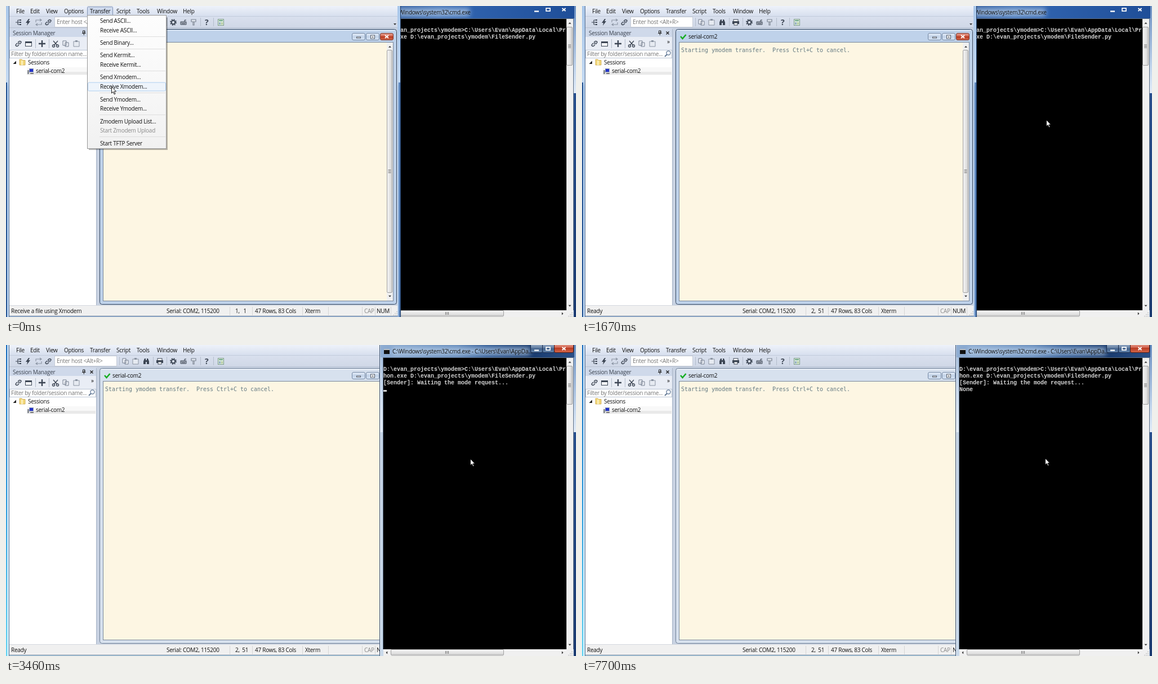
These frames come from a looping animation (1012 px wide and 553 px high, 8 s). An HTML page:

```html
<!DOCTYPE html>
<html lang="en">
<head>
<meta charset="utf-8">
<title>Ymodem transfer</title>
<style>
html, body { margin: 0; width: 100%; height: 100%; overflow: hidden; background: #1b3c74; }
svg { display: block; width: 100vw; height: 100vh; }
text { white-space: pre; font: 10px "Open Sans", "Noto Sans", sans-serif; letter-spacing: -.27px; fill: #111; }
.term { font: 10px "DejaVu Sans Mono", "Noto Sans Mono", monospace; letter-spacing: -.02px; fill: #657b83; }
.con { font: bold 10px "Liberation Mono", "Noto Sans Mono", monospace; letter-spacing: 0; fill: #d4d4d4; }
.head { fill: #3c4450; }
.soft { fill: #777; }
.dim { fill: #8a8a8a; }
</style>
</head>
<body>
<svg id="stage" viewBox="0 0 1012 553" preserveAspectRatio="none"></svg>
<script>
const LOOP = 8000;
const stage = document.getElementById('stage');
const esc = s => s.replace(/&/g, '&amp;').replace(/</g, '&lt;').replace(/>/g, '&gt;');

// Text is placed by its left edge and the middle of its capitals.
const text = (x, mid, s, cls = '', id = '') =>
  `<text x="${x}" y="${mid + 3.6}" class="${cls}" id="${id}">${esc(s)}</text>`;
const rect = (x, y, w, h, fill, more = '') =>
  `<rect x="${x}" y="${y}" width="${w}" height="${h}" fill="${fill}" ${more}/>`;
const box = (x, y, w, h, fill, line, r = 0) =>
  rect(x + .5, y + .5, w - 1, h - 1, fill, `stroke="${line}" rx="${r}"`);
const path = (d, fill, line = 'none', w = 1) =>
  `<path d="${d}" fill="${fill}" stroke="${line}" stroke-width="${w}"/>`;
const icon = (x, y, body) => `<g transform="translate(${x} ${y})">${body}</g>`;
const group = (id, body) => `<g id="${id}">${body}</g>`;
const vline = (x, y, h, c = '#b3bccb') => rect(x, y, 1, h, c);
const grad = (id, stops, across) =>
  `<linearGradient id="${id}" x2="${across ? 1 : 0}" y2="${across ? 0 : 1}">` +
  stops.map(([o, c]) => `<stop offset="${o}" stop-color="${c}"/>`).join('') + '</linearGradient>';

const INK = '#3d4654';
const shape = {
  link: path('M-1 1L2-2M-2-1l-2 2q-2 2 0 3t3 0l2-2M2 1l2-2q2-2 0-3t-3 0l-2 2', 'none', INK, 1.4),
  tree: path('M-5 0H-1M-1-4V4M-1-4H4M-1 0H4M-1 4H4', 'none', INK, 1.2) +
    rect(2, -5, 3, 2, INK) + rect(2, -1, 3, 2, INK) + rect(2, 3, 3, 2, INK),
  bolt: path('M1-6L-4 1H-1L-2 6 4-2H1L3-6Z', INK),
  loop: path('M-5 0V-4H4M2-6l3 2-3 2M5 0V4H-4M-2 2l-3 2 3 2', 'none', '#8a93a2', 1.1),
  copy: path('M-5-5H1V3H-5ZM-1-2H5V5H-1Z', '#edf0f6', '#737d8d'),
  paste: path('M-5-4H5V5H-5Z', '#e6eaf1', '#8b94a2') + rect(-2, -6, 4, 3, '#8b94a2'),
  find: path('M-5 5V0L-3-5H-1V-2H1V-5H3L5 0V5H1V1H-1V5Z', INK),
  print: rect(-4, -5, 8, 4, '#fff', `stroke="${INK}"`) + rect(-6, -2, 12, 5, INK) + rect(-3, 1, 6, 4, '#fff', `stroke="${INK}"`),
  gear: `<circle r="3.3" fill="none" stroke="${INK}" stroke-width="2"/>` +
    `<circle r="5" fill="none" stroke="${INK}" stroke-width="1.8" stroke-dasharray="2 1.93"/>`,
  keys: path('M-5-1H5V4H-5ZM2-1V-4H5', '#b9c0cc', INK) + path('M-4 1H4M-3 2.7H3', 'none', INK, .8),
  key: path('M-4-5H4V-1H-4ZM-1-1V5H1V-1', '#dfe4ec', '#7b8492', 1.2),
  pane: box(-6, -4, 12, 9, '#f4f6fa', INK) + rect(-6, -4, 12, 3, INK),
  plus: path('M-6 0H6M0-6V6', 'none', INK, 2.4),
  cut: path('M-4-5L3 3M4-5L-3 3', 'none', INK, 1.4) +
    `<circle cx="-3.5" cy="4" r="2" fill="none" stroke="${INK}" stroke-width="1.4"/><circle cx="3.5" cy="4" r="2" fill="none" stroke="${INK}" stroke-width="1.4"/>`,
  sheet: box(-5, -6, 11, 12, '#dcebdd', '#7f9d8a') + rect(-3, -4, 7, 2, '#6fa888') + rect(-3, 0, 3, 4, '#93aec2') + rect(1, 0, 3, 4, '#b7cda4'),
  cross: path('M-2.5-2.5L2.5 2.5M2.5-2.5L-2.5 2.5', 'none', '#222', 1.4),
  pin: path('M-1.5-4H2V0H-1.5ZM-3 .5H3.5M.3 .5V4M1.4-4V0', 'none', '#222'),
};
const put = list => list.map(([name, x, y]) => icon(x, y, shape[name])).join('');

const arrow = (x, y, dir) => icon(x, y,
  path({ up: 'M-2.5 1.2L0-1.5 2.5 1.2Z', down: 'M-2.5-1.2L0 1.5 2.5-1.2Z',
         left: 'M1.2-2.5L-1.5 0 1.2 2.5Z', right: 'M-1.2-2.5L1.5 0-1.2 2.5Z' }[dir], '#333'));
const grip = (x, y, tall) => path(tall ? `M${x - 2.5} ${y - 2.5}h5m-5 2.5h5m-5 2.5h5`
  : `M${x - 2.5} ${y - 2.5}v5m2.5-5v5m2.5-5v5`, 'none', '#666', .9);
const scroller = (x, y, w, h, from, to) =>
  rect(x, y, w, h, '#f0f0f0') + arrow(x + w / 2, y + 7.5, 'up') + arrow(x + w / 2, y + h - 8, 'down') +
  box(x, from, w - 1, to - from, 'url(#thumb)', '#a0a0a0', 1.5) + grip(x + w / 2 - .5, (from + to) / 2, true);

const defs = '<defs>' +
  grad('menubar', [[0, '#eef2fa'], [1, '#d7dfee']]) +
  grad('tools', [[0, '#d9e0ee'], [1, '#cfd7e6']]) +
  grad('thumb', [[0, '#f5f5f5'], [.5, '#e6e6e6'], [1, '#cfcfcf']], true) +
  grad('thumbH', [[0, '#f5f5f5'], [.5, '#e6e6e6'], [1, '#cfcfcf']]) +
  grad('button', [[0, '#e6eef9'], [.5, '#c3d3e8'], [1, '#d8e5f5']]) +
  grad('red', [[0, '#e8a597'], [.48, '#cf5e48'], [.5, '#b93a21'], [1, '#d2694d']]) +
  grad('navy', [[0, '#a3b6cf'], [.5, '#5f7b9f'], [.52, '#3f5f89'], [1, '#6686ad']]) +
  grad('popup', [[0, '#fdfdfd'], [.5, '#f8f8f8'], [1, '#f1f1f1']]) +
  grad('leftOn', [[0, '#a9c7ea'], [.24, '#c3d9f2'], [.26, '#a9c8ec'], [1, '#bad3f0']]) +
  grad('leftOff', [[0, '#c3dbf3'], [.5, '#cfe6f8'], [1, '#cdf0fb']]) +
  grad('desk', [[0, '#1f6fbd'], [.5, '#2f9bdc'], [1, '#63d3f2']]) +
  grad('titleOff', [[0, '#244f92'], [.3, '#4070b4'], [.45, '#2f62ad'], [1, '#1f4e98']], true) +
  grad('titleOn', [[0, '#8fadd2'], [.4, '#5f86b8'], [.55, '#2a5590'], [.75, '#16386b'], [1, '#2a4f86']], true) +
  grad('edge', [[0, '#6f93c3'], [.2, '#c3d6ed'], [.28, '#e2ecf8'], [.281, '#28508e'], [1, '#1a3a70']]) +
  grad('glass', [[0, '#9db8d8'], [.15, '#cbdbee'], [.28, '#e2ebf6'], [.281, '#c3d2e4'], [1, '#c9d9ea']]) +
  '<filter id="blur" x="-20%" y="-80%" width="140%" height="260%"><feGaussianBlur stdDeviation="4"/></filter></defs>';

const menus = [['File', 18], ['Edit', 43], ['View', 71], ['Options', 103], ['Transfer', 149],
  ['Script', 196], ['Tools', 232], ['Window', 268], ['Help', 314]];
const entries = [['Send ASCII...', 26], ['Receive ASCII...', 43], ['Send Binary...', 65], ['Send Kermit...', 87.5],
  ['Receive Kermit...', 104], ['Send Xmodem...', 126.5], ['Receive Xmodem...', 143.5], ['Send Ymodem...', 166],
  ['Receive Ymodem...', 182.5], ['Zmodem Upload List...', 205], ['Start Zmodem Upload', 221.5], ['Start TFTP Server', 244]];

const menuHead = box(144, 1, 46, 16, '#cfdaed', '#8193b3', 1);
const popup = group('popup',
  rect(147, 20, 140, 236, '#000', 'opacity=".28"') +
  box(144, 16, 141, 238, 'url(#popup)', '#979797') +
  [54, 76, 115, 154, 193, 232].map(y => rect(166, y, 117, 1, '#dedede')).join('') +
  '<rect id="hot" x="145.5" width="138" height="15" rx="2" fill="#eef4fb" stroke="#aecff0"/>' +
  entries.map(([s, y]) => text(167, y, s, s === 'Start Zmodem Upload' ? 'dim' : '')).join(''));

const toolbar =
  rect(6, 18, 689, 23, 'url(#tools)') + rect(6, 18, 689, 1, '#c3ccdc') + rect(6, 38, 689, 1, '#bac4d5') +
  box(86, 19, 111, 19, '#fff', '#c5cbd6') + text(90, 28.5, 'Enter host <Alt+R>', 'soft') +
  put([['tree', 22, 29], ['bolt', 39, 29], ['loop', 58, 29], ['link', 75, 29], ['copy', 212, 29], ['paste', 230, 29],
    ['find', 249, 29], ['print', 273, 29], ['gear', 297, 29], ['keys', 315, 29], ['key', 333, 29], ['sheet', 381, 29]]) +
  [201, 261, 285, 345, 368].map(x => vline(x, 21, 15)).join('') +
  '<text x="353" y="34" style="font-size:14px;font-weight:700;fill:#3d4654">?</text>' +
  path('M688 31h5l-2.5 3Z', '#333');

const sessions =
  rect(6, 41, 154, 491, '#fff') + rect(6, 41, 154, 14, '#cfd9ea') + text(12, 48, 'Session Manager', 'head') +
  put([['pin', 138, 48], ['cross', 152, 48]]) +
  rect(6, 55, 154, 23, '#e9edf5') + text(151, 63, '»') +
  put([['link', 22, 67], ['pane', 40, 67], ['plus', 64, 67], ['cut', 88, 67], ['copy', 106, 67], ['paste', 125, 67]]) +
  vline(52, 59, 16) + vline(76, 59, 16) +
  box(6, 78, 154, 15, '#fff', '#bcc6d5') + text(9, 85.5, 'Filter by folder/session name...', 'soft') +
  '<circle cx="153.5" cy="83.5" r="3.6" fill="#f5f9ff" stroke="#5c7390" stroke-width="1.2"/>' +
  path('M151 86l-4 4', 'none', '#5c7390', 1.8) +
  path('M18 97.5V103h-5.5Z', '#222') +
  path('M24 95h4l1 1.5h5V105H24Z', '#f3d87a', '#c9a44a', .8) + rect(27, 97, 3, 8, '#fbeeb5') +
  text(39, 100.5, 'Sessions') +
  rect(37, 109, 122, 14, '#f8f8f8') + rect(37, 117, 122, 5, '#e9e9e9') +
  rect(38, 114, 3, 7, '#8a8f96') + box(41, 111, 8, 7, '#2333c8', '#9ba5bd') + rect(43, 119, 6, 2, '#777') +
  text(53, 115.5, 'serial-com2') + vline(160, 41, 491, '#a9b5c7');

const button = (x, y, w, h, glyph, fill = 'url(#button)', line = '#7387a3') =>
  box(x, y, w, h, fill, line, 2.5) + icon(x + w / 2, y + h / 2, glyph);
const min = box(-4, 0, 8, 3, '#fff', '#4c5563');
const max = box(-4, -3, 8, 7, '#fff', '#4c5563') + rect(-1.5, 0, 3, 1.5, '#4c5563');
const close = path('M-3-2.5L3 2.5M3-2.5L-3 2.5', 'none', '#fff', 2);

const child =
  rect(161, 39, 534, 493, '#c8d2e2') +
  '<rect id="frame" x="166.5" y="41.5" width="527" height="489" rx="4"/>' +
  rect(168, 43, 524, 1, '#fff', 'opacity=".6"') +
  path('M175 54l3.5 4 6-7', 'none', '#17ae22', 2.6) + text(189, 54.5, 'serial-com2') +
  button(614, 48, 24, 13, min) + button(639, 48, 24, 13, max) +
  button(664, 48, 24, 13, close, 'url(#red)', '#7c352b') +
  box(172, 64, 516, 461, '#fdf6e3', '#77869a') +
  scroller(676, 65, 11, 459, 78, 510) +
  text(176, 78.5, 'Starting ymodem transfer.  Press Ctrl+C to cancel.', 'term', 'note');

const status =
  rect(6, 532, 689, 19, '#f0f0f0') + rect(6, 532, 689, 1, '#d4d8df') + rect(5, 551, 691, 1, '#536b8c') +
  text(9, 542.5, '', '', 'hint') + text(285, 542.5, 'Serial: COM2, 115200') + text(407, 542.5, '', '', 'place') +
  text(442, 542.5, '47 Rows, 83 Cols') + text(531, 542.5, 'Xterm') + text(636, 542.5, 'CAP', 'dim') + text(658, 542.5, 'NUM') +
  [397, 437, 526, 572, 632, 655, 683].map(x => vline(x, 535, 15, '#d5d5d5')).join('') +
  path('M694 543v1M691 546v1M694 546v1M688 549v1M691 549v1M694 549v1', 'none', '#aaa', 1.5);

const main = group('main',
  rect(0, 0, 701, 553, 'url(#leftOn)', 'id="rim"') + group('rimOn',
    rect(0, 136, 2, 417, '#285694') + rect(697, 136, 3, 417, '#5d85ba') + rect(700, 0, 1, 553, '#17345f')) +
  group('rimOff', rect(0, 0, 2, 553, 'url(#desk)')) +
  rect(5, 0, 1, 553, '#536b8c') + rect(6, 0, 689, 18, 'url(#menubar)') +
  group('menuHead', menuHead) + menus.map(([s, x]) => text(x, 9, s)).join('') +
  toolbar + sessions + child + status + popup);

const white = { min: path('M-4 1.5H4', 'none', '#fff', 2.4), max: rect(-3.5, -2.5, 7, 5, 'none', 'stroke="#fff" stroke-width="1.7"') };
const cmd = group('cmd',
  rect(1007, 0, 5, 553, 'url(#edge)') + rect(663, 0, 345, 553, 'url(#glass)') +
  rect(663, 0, 346, 22, 'url(#titleOff)', 'id="bar"') +
  '<rect id="glow" x="686" y="4" height="14" fill="#c0d5ed" opacity=".7" filter="url(#blur)"/>' +
  group('keysOn', button(931, -3, 22, 17, '', 'url(#navy)', '#17294a') + button(952, -3, 22, 17, '', 'url(#navy)', '#17294a') +
    button(973, -3, 35, 17, '', 'url(#red)', '#4d1b17')) +
  icon(942, 8, white.min) + icon(962.5, 6.5, white.max) + icon(990.5, 6.5, close) +
  rect(671, 7, 10, 9, '#111') + rect(671, 7, 10, 2, '#b9c0c8') +
  text(686, 11.5, '', '', 'title') +
  rect(669, 22, 339, 519, '#5d6f86') + rect(670, 23, 325, 518, '#000') +
  ['D:\\evan_projects\\ymodem>C:\\Users\\Evan\\AppData\\Local\\Pr', 'hon.exe D:\\evan_projects\\ymodem\\FileSender.py']
    .map((s, i) => text(670, 42 + 12 * i, s, 'con')).join('') +
  text(670, 66, '[Sender]: Waiting the mode request...', 'con', 'wait') + text(670, 78, 'None', 'con', 'none') +
  '<rect id="caret" x="670" width="6" height="3" fill="#d4d4d4"/>' +
  scroller(995, 23, 12, 518, 37, 106) +
  rect(670, 541, 337, 12, '#f0f0f0') + arrow(676, 547, 'left') + arrow(988, 547, 'right') +
  box(683, 541, 201, 11, 'url(#thumbH)', '#a0a0a0', 1.5) + grip(783, 546.5) +
  path('M1005 545v1M1002 548v1M1005 548v1M999 551v1M1002 551v1M1005 551v1', 'none', '#aaa', 1.5) +
  rect(663, 0, 1, 553, '#3a4f6c') + rect(664, 0, 1, 553, '#fff', 'opacity=".5"'));

const pointer = group('pointer', path('M.5.5V12L3.2 9.5 5.2 14 7 13.2 5 9H8.5Z', '#fff', '#000', .9));

stage.innerHTML = defs + group('windows', cmd + main) + pointer;
const el = {};
stage.querySelectorAll('[id]').forEach(e => { if (e.id) el[e.id] = e; });
const show = (name, on) => el[name].setAttribute('visibility', on ? 'visible' : 'hidden');
const set = (name, key, value) => el[name].setAttribute(key, value);
const write = (name, s) => { if (el[name].textContent !== s) el[name].textContent = s; };

// Each step holds from its time until the next one.
const moves = [[0, 187, 143], [160, 188, 150], [290, 191, 159], [410, 194, 170], [540, 196, 179], [1250, 233, 185],
  [1400, 621, 208], [1550, 795, 204], [1670, 824, 202], [4910, 823, 201], [5060, 822, 201]];
const hovers = [[0, 143.5, 'Receive a file using Xmodem'], [290, 166, 'Send a file using Ymodem'], [540, 182.5, 'Receive a file using Ymodem']];
const carets = [[0, 0], [3460, 80], [4050, 0], [4480, 80], [5060, 0], [6150, 92], [6710, 0], [7140, 92], [7700, 0]];
const at = (steps, t) => steps.filter(s => s[0] <= t).pop();

function draw(t) {
  const open = t < 970, front = t >= 1940, running = t >= 2470;
  const [, x, y] = at(moves, t), [, row, hint] = at(hovers, t), caret = at(carets, t)[1];

  const top = front ? el.cmd : el.main;
  if (el.windows.lastChild !== top) el.windows.appendChild(top);

  show('popup', open);
  show('menuHead', open);
  set('hot', 'y', row - 7.5);
  show('note', !open);
  write('hint', open ? hint : 'Ready');
  write('place', open ? '1,   1' : '2,  51');

  set('rim', 'fill', front ? 'url(#leftOff)' : 'url(#leftOn)');
  show('rimOn', !front);
  show('rimOff', front);
  set('frame', 'fill', front ? '#d7e1ee' : '#bfd2ea');
  set('frame', 'stroke', front ? '#6f7f95' : '#34465f');
  set('bar', 'fill', front ? 'url(#titleOn)' : 'url(#titleOff)');
  set('glow', 'width', running ? 244 : 137);
  show('keysOn', front);
  write('title', 'C:\\Windows\\system32\\cmd.exe' + (running ? ' - C:\\Users\\Evan\\AppDa...' : ''));

  show('wait', t >= 2620);
  show('none', t >= 5590);
  show('caret', caret > 0);
  set('caret', 'y', caret);
  set('pointer', 'transform', `translate(${x} ${y})`);
}

const start = performance.now();
function tick() {
  draw((performance.now() - start) % LOOP);
  requestAnimationFrame(tick);
}
tick();
</script>
</body>
</html>
```
